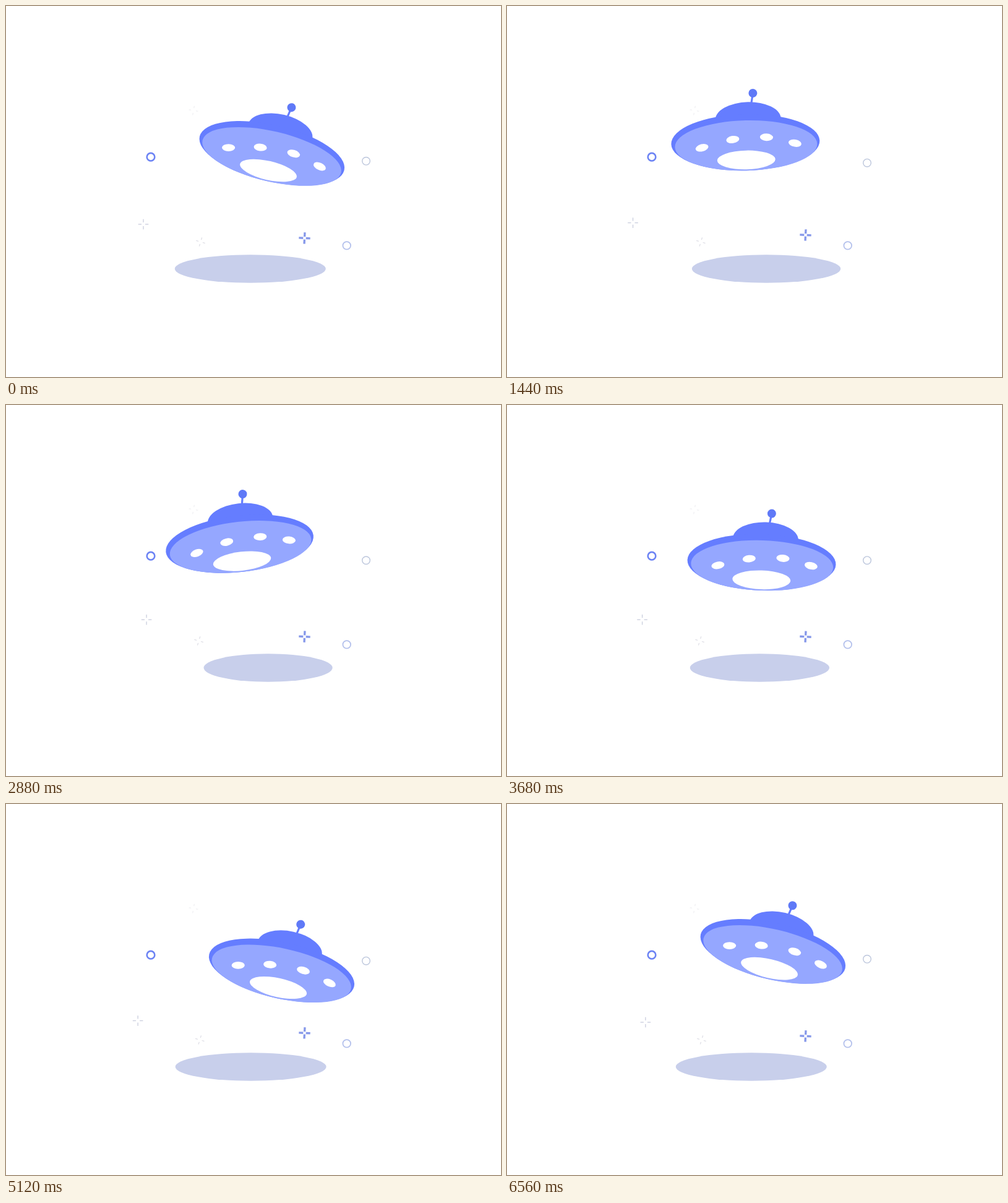
Animation of 800 by 600 pixels, one loop 6.6 s. Source, as an HTML page with a canvas:

```html
<!DOCTYPE html>
<html lang="en">
<head>
<meta charset="utf-8">
<title>Hovering saucer</title>
<style>
html, body { margin: 0; width: 100%; height: 100%; overflow: hidden; background: #fff; }
canvas { display: block; }
</style>
</head>
<body>
<canvas id="stage" width="800" height="600"></canvas>
<script>
const ctx = document.getElementById('stage').getContext('2d');
const LOOP = 6600, STEP = 40, TAU = Math.PI * 2, DEG = Math.PI / 180;
const DARK = '#657dff', LIGHT = '#95a7ff', SHADOW = '#c8cfeb';

// Sine-eased value from [time, value] keys
function track(t, keys) {
  const i = keys.findIndex(([time]) => time > t);
  const [t0, a] = keys[i - 1], [t1, b] = keys[i];
  return a + (b - a) * (1 - Math.cos(Math.PI * (t - t0) / (t1 - t0))) / 2;
}

// Bobbing between -1 and 1, a whole number of cycles per loop
const wave = (t, cycles) => Math.cos(TAU * cycles * t / LOOP);

const ship = {
  x: [[0, 424], [2240, 372], [4880, 440.8], [LOOP, 424]],
  y: [[0, 266], [2240, 242.2], [4600, 302.8], [LOOP, 266]],
  tilt: [[0, 13.2], [2350, -8.4], [5050, 12.5], [LOOP, 13.2]]
};
const shadow = {
  x: [[0, 394.75], [2240, 428.6], [4750, 395.7], [LOOP, 394.75]],
  rx: [[0, 122], [1050, 122], [2950, 104], [4450, 122], [LOOP, 122]]
};
const wander = [[0, 222], [1100, 199.5], [2500, 228.5], [4300, 215], [6000, 211], [LOOP, 224]];

function ellipse(x, y, rx, ry, color, tilt = 0) {
  ctx.fillStyle = color;
  ctx.beginPath();
  ctx.ellipse(x, y, rx, ry, tilt * DEG, 0, TAU);
  ctx.fill();
}

function ring(x, y, color, width) {
  ctx.strokeStyle = color;
  ctx.lineWidth = width;
  ctx.beginPath();
  ctx.arc(x, y, 6.3, 0, TAU);
  ctx.stroke();
}

// Four short arms around an open centre
function sparkle(x, y, angle, inner, outer, color, width) {
  ctx.save();
  ctx.translate(x, y);
  ctx.rotate(angle * DEG);
  ctx.fillStyle = color;
  for (let i = 0; i < 4; i++) {
    ctx.fillRect(inner, -width / 2, outer - inner, width);
    ctx.rotate(TAU / 4);
  }
  ctx.restore();
}

function drawSky(t) {
  ring(234, 244.2, '#6c83f4', 2.6);
  ring(582, 252.3 - 1.5 * wave(t, 2), '#bcc6dc', 1.4);
  ring(550.7, 387.4, '#b3c0ec', 1.8);
  sparkle(482.5, 372.8 + 2.6 * wave(t, 2), 3, 2.2, 9.2, '#8799ea', 3.4);
  sparkle(track(t, wander), 350 + 3 * wave(t, 1), 0, 3, 8.3, '#c9cddd', 1.3);
  sparkle(313 + 1.5 * wave(t, 1), 381.5, 17, 3.5, 7.5, '#dcdce4', 1.2);
  sparkle(303, 169, 10, 4, 7.5, '#ececf0', 1.1);
}

// Local origin is the centre of the lower hatch
function drawShip(t) {
  ctx.save();
  ctx.translate(track(t, ship.x), track(t, ship.y));
  ctx.rotate(track(t, ship.tilt) * DEG);

  ctx.strokeStyle = DARK;
  ctx.lineWidth = 3.2;
  ctx.beginPath();
  ctx.moveTo(13.2, -107.7);
  ctx.lineTo(10, -90);
  ctx.stroke();
  ellipse(13.2, -107.7, 7, 7, '#5f79f7');

  ellipse(4.5, -66, 53, 27.5, DARK);
  ellipse(-0.7, -28.4, 120, 45.6, DARK);
  ellipse(0.2, -23.3, 115, 40.6, LIGHT);
  ellipse(0, 0, 47, 15.3, '#fff');
  for (const [x, y, tilt] of [[-71.1, -21.3, -13], [-21.1, -33.5, -7], [33.5, -35.9, 4], [79.3, -25.3, 11]])
    ellipse(x, y, 10.6, 5.9, '#fff', tilt);
  ctx.restore();
}

function draw(t) {
  ctx.clearRect(0, 0, 800, 600);
  ellipse(track(t, shadow.x), 425, track(t, shadow.rx), 22.8, SHADOW);
  drawSky(t);
  drawShip(t);
}

const start = performance.now();
function frame() {
  const t = (performance.now() - start) % LOOP;
  draw(Math.floor(t / STEP) * STEP);
  requestAnimationFrame(frame);
}
frame();
</script>
</body>
</html>
```
